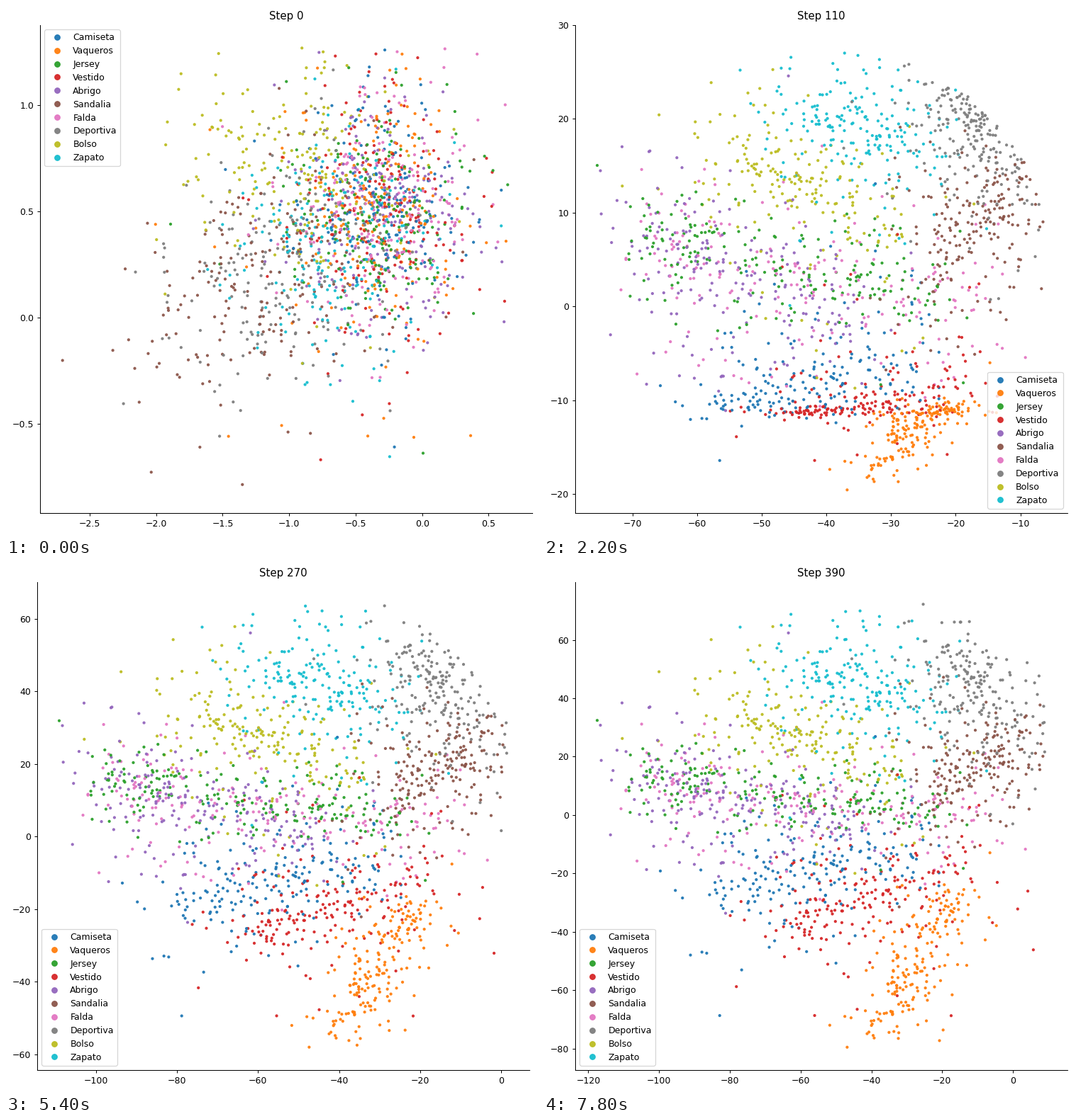
Write a matplotlib script that moves like this. It is 750 by 747 pixels and loops after 8000 ms.

```python
import numpy as np
import matplotlib.pyplot as plt
from matplotlib.animation import FuncAnimation
from matplotlib.lines import Line2D

W, H, DPI = 750, 747, 90
AX_W, AX_H, AX_LEFT, AX_BOTTOM = 694, 689, 44, 31
FRAMES, INTERVAL = 40, 200
PER_CLASS = 195
ALPHA = 0.95

rng = np.random.default_rng(5)

# Where each class settles, in pixels: a bar from one end to the other, and its thickness
BARS = {
    "Camiseta": ((240, 450), (530, 400), 42),
    "Vaqueros": ((475, 655), (585, 460), 32),
    "Jersey": ((130, 298), (570, 350), 24),
    "Vestido": ((340, 510), (590, 410), 48),
    "Abrigo": ((130, 295), (440, 370), 42),
    "Sandalia": ((550, 325), (665, 255), 42),
    "Falda": ((160, 310), (620, 360), 42),
    "Deportiva": ((560, 125), (670, 240), 46),
    "Bolso": ((250, 200), (500, 300), 52),
    "Zapato": ((360, 150), (540, 200), 50),
}

# Every class starts in one heap; these lean away from it
HEAP = np.array([522, 288])
LEAN = {"Sandalia": (-175, 105), "Deportiva": (-140, 75),
        "Zapato": (-60, 55), "Bolso": (-125, -65)}

# Axis limits at the turning points of the zoom
ZOOM_STEPS = [0, 80, 110, 160, 230, 310, 390]
X_LO = [2.873, 76.25, 78.9, 97.5, 112.1, 116.9, 123.7]
X_HI = [0.828, -2.68, -2.7, -0.77, 3.24, 10.67, 15.4]
Y_LO = [0.92, 0.881, 22.04, 35.4, 58.25, 71.1, 87.4]
Y_HI = [1.377, 8.461, 30.0, 50.1, 66.2, 74.2, 79.8]


def start_cloud(name):
    lean = rng.uniform(0.3, 1.6, (PER_CLASS, 1)) * np.array(LEAN.get(name, (0, 0)))
    return HEAP + lean + rng.standard_t(6, (PER_CLASS, 2)) * (54, 72)


def end_cloud(name):
    a, b, width = BARS[name]
    along = rng.random((PER_CLASS, 1)) ** 1.15
    blur = rng.standard_normal((PER_CLASS, 2)) * rng.uniform(0.2, 1.6, (PER_CLASS, 1))
    return np.array(a) * (1 - along) + np.array(b) * along + blur * width


start = np.concatenate([start_cloud(n) for n in BARS])
end = np.concatenate([end_cloud(n) for n in BARS])

# One jersey strays far to the left
stray = 2 * PER_CLASS
start[stray], end[stray] = (228, 308), (75, 222)

tab = plt.get_cmap("tab10").colors
order = rng.permutation(len(start))
start, end = start[order], end[order]
colors = np.repeat(tab, PER_CLASS, axis=0)[order]


def fold(v, lo, hi):
    """Mirror values that leave [lo, hi] back inside."""
    return hi - np.abs(hi - lo - np.abs(v - lo))


def fold_rim(x, y, radius, cx=400, cy=372):
    """Keep the right half of the cloud inside a circle."""
    d = np.maximum(np.hypot(x - cx, y - cy), 1)
    k = np.where(x > cx, (radius - np.abs(radius - d)) / d, 1)
    return cx + (x - cx) * k, cy + (y - cy) * k


def positions(step):
    x, y = end.T
    # The lower half hangs at first and is slowly drawn up into the band
    sag = 110 * np.exp(-max(step - 110, 0) / 110)
    y = y + sag * np.exp(-((y - 430) / 110) ** 2)
    x, y = fold_rim(x, y, 316 + 0.22 * max(step - 160, 0))

    # Before step 110 the cloud is slanted and flatter
    slant = np.clip((110 - step) / 30, 0, 1)
    y = 370 + (1 - 0.25 * slant) * (y - 370) + 0.75 * slant * (x - 390)

    mix = min(step / 80, 1)
    x = start[:, 0] * (1 - mix) + x * mix
    y = start[:, 1] * (1 - mix) + y * mix
    x, y = fold(x, 75, 706), fold(y, 58, 685)
    return np.column_stack([(x - AX_LEFT) / AX_W, (H - AX_BOTTOM - y) / AX_H])


plt.rcParams["font.family"] = "DejaVu Sans"
fig = plt.figure(figsize=(W / DPI, H / DPI), dpi=DPI, facecolor="white")
ax = fig.add_axes([0.1, 0.1, 0.8, 0.8])
ax.spines[["top", "right"]].set_visible(False)
dots = ax.scatter(*start.T, s=11.3, c=colors, linewidths=0, alpha=ALPHA)
title = ax.set_title("Step 0")
handles = [Line2D([], [], ls="", marker="o", color=c, alpha=ALPHA, label=name)
           for name, c in zip(BARS, tab)]
legend = ax.legend(handles=handles, loc="upper left", labelspacing=0.47)


def grow(step, values):
    return np.exp(np.interp(step, ZOOM_STEPS, np.log(values)))


def legend_spot(step):
    if step < 40:
        return "upper left"
    if step < 100:
        return "upper right"
    return "lower right" if step < 140 else "lower left"


def label_width(lo, hi):
    ticks = [t for t in ax.get_yticks() if lo <= t <= hi]
    labels = ax.yaxis.get_major_formatter().format_ticks(ticks)
    size = {"\u2212": 10.3, ".": 4}
    return max(sum(size.get(ch, 7.9) for ch in s) for s in labels)


def draw(i):
    step = 10 * i
    x0, x1 = -grow(step, X_LO), np.interp(step, ZOOM_STEPS, X_HI)
    y0, y1 = -grow(step, Y_LO), grow(step, Y_HI)
    ax.set_xlim(x0, x1)
    ax.set_ylim(y0, y1)
    left = round(18 + label_width(y0, y1))
    ax.set_position([left / W, AX_BOTTOM / H, AX_W / W, AX_H / H])

    dots.set_offsets(np.array([x0, y0]) + positions(step) * (x1 - x0, y1 - y0))
    title.set_text(f"Step {step}")
    legend.set_loc(legend_spot(step))
    return dots, title, legend


anim = FuncAnimation(fig, draw, frames=FRAMES, interval=INTERVAL,
                     init_func=lambda: draw(0), repeat=True, repeat_delay=0, blit=False)
plt.show()
```
